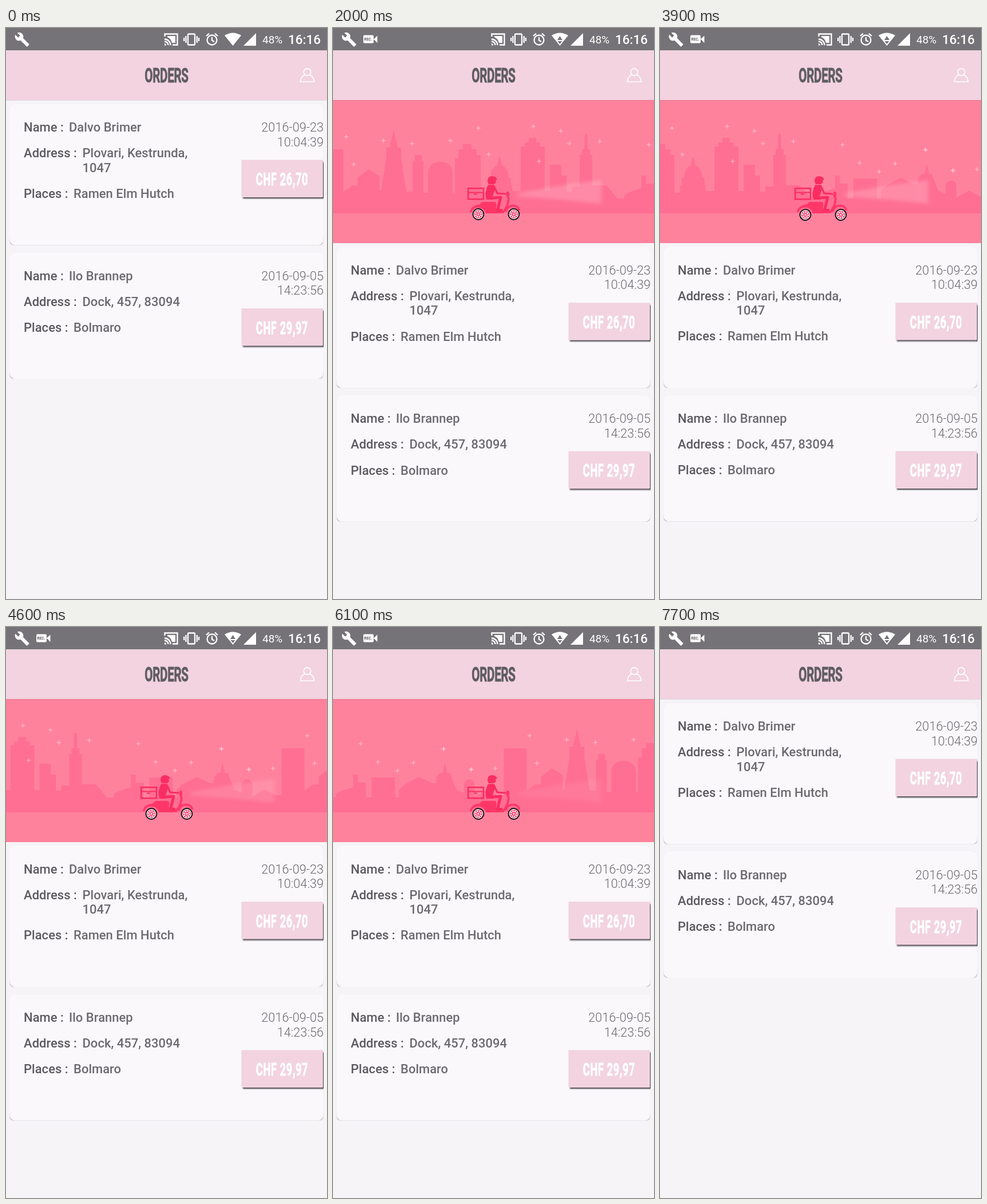
Animation, 561 px wide and 998 px high, one loop 7.8 s. Source, as an HTML page:

```html
<!DOCTYPE html>
<html lang="en">
<head>
<meta charset="utf-8">
<title>Orders</title>
<style>
html, body { margin: 0; width: 100%; height: 100%; overflow: hidden; background: #f6f4f7; }
svg { display: block; width: 100vw; height: 100vh; font-family: Roboto, sans-serif; }
.label { font-size: 22px; font-weight: 500; fill: #5b595e; }
.value { font-size: 22px; font-weight: 500; fill: #6c6a6f; }
.date { font-size: 21.7px; font-weight: 300; fill: #6a686d; text-anchor: end; }
.caps { font-weight: 700; text-anchor: middle; }
.line { fill: none; stroke: #fff; }
.soft { filter: blur(.7px); }
</style>
</head>
<body>
<svg id="stage" viewBox="0 0 561 998"></svg>
<script>
const LOOP = 7800, STEP = 100, TOWN = 824, REST = 249.5;
const SKY = '#ff829d', CITY = '#ff6f93', RED = '#f92d61', BAR = '#757377', PINK = '#f2d3df';

const text = (cls, x, y, str, extra = '') => `<text class="${cls}" x="${x}" y="${y}" ${extra}>${str}</text>`;
// Narrow display face for the title and the prices
const caps = (x, y, size, fill, gap, str) =>
  `<g transform="translate(${x} ${y}) scale(.6 1)">${text('caps', 0, 0, str,
    `font-size="${size}" fill="${fill}" stroke="${fill}" stroke-width=".8" letter-spacing="${gap}"`)}</g>`;
const row = (y, label, x, lines) =>
  text('label', 31, y, label + ' :') + lines.map((s, i) => text('value', x, y + i * 25.5, s)).join('');

function card(y, h, o) {
  const wrap = (o.address.length - 1) * 25.5;
  return `<g transform="translate(0 ${y})">
    <rect x="6.5" y="4" width="548" height="${h - 4}" rx="6" fill="#bfbdc1"/>
    <rect x="6" y="-.5" width="549" height="${h - 6}" rx="9" fill="#f0eef2"/>
    <rect x="6.5" width="548" height="${h}" rx="9" fill="#faf8fb"/>
    ${row(48.5, 'Name', 110, [o.name])}
    ${row(93.5, 'Address', 133.5, o.address)}
    ${row(138.8 + wrap, 'Places', 118, [o.place])}
    ${text('date', 555, 48.5, o.day)}${text('date', 555, 74, o.time)}
    <g clip-path="url(#cardEdge)">
      <rect x="414" y="102" width="143" height="63.5" fill="#3c3a3e" style="filter:blur(1px)"/>
      <rect x="411.5" y="98" width="142.5" height="65.5" rx="1" fill="${PINK}"/>
    </g>
    ${caps(482.5, 142.5, 30.5, '#fff', 1, o.price)}
  </g>`;
}

const stars = [[26,247],[86,190],[99,238],[151,197],[201,202],[268,197],[317,175],[335,221],[413,172],[423,233],
  [461,180],[476,202],[529,198],[615,204],[645,236],[679,251],[707,237],[760,213],[808,249]];
const star = ([x, y]) =>
  `<path d="M${x} ${y - 5}l1.3 3.7 3.7 1.3-3.7 1.3-1.3 3.7-1.3-3.7-3.7-1.3 3.7-1.3z" fill="#fff" opacity="${x > 750 ? .5 : .32}"/>`;

const town = `<g id="town">
  <path class="soft" fill="${CITY}" d="M-14 324V299L12 284 30 294H41V212H81V286L97 275H106V262L125 247 144 259V284H147
    L156 228V209H162L169 178 176 209H182V228L191 286H202V232H206V222H218V232H221V288H229V252Q231 234 250 234
    Q270 234 272 252V288H276V228H282V212H290V203H305V212H314V222H321V288H331V275H334V262H338Q339 244 350 240
    L353 225H355L358 240Q369 244 370 262H374V275H376V285H391V207H398V200H405V192H418V200H425V207H433V285H442
    V239H462V258H471V286H480V277H494V222H498V212H502L503 185H507L508 212H512V222H516V275H540L546 281 560 298H572V292
    L580 287 602 280V258H610V272H624V298H634V263H675V298H682V284L692 275 717 262 740 273H747V262L754 255H758
    L762 237 766 255H771L782 284 795 290V275Q797 267 805 266 813 267 814 275V298H838V324Z"/>
  ${stars.map(star).join('')}</g>`;

const wheel = id => `<g id="${id}"><circle r="9.4" fill="#fff" stroke="#151013" stroke-width="2"/>
  <circle r="6.6" fill="none" stroke="${RED}" stroke-width="1"/>
  <path d="M-6.5 0H6.5M0-6.5V6.5M-4.6-4.6L4.6 4.6M-4.6 4.6L4.6-4.6" stroke="${RED}" stroke-width="1.5"/>
  <circle r="2" fill="#fff" stroke="${RED}"/></g>`;

const bike = `
  <g fill="none" stroke="#ff3768">
    <path d="M284 322H297Q306 312 307 299L304 291" stroke-width="3.6"/>
    <path d="M302 321Q304 310.500 315 310.500 324 311 326 319" stroke-width="3.4"/>
  </g>
  <g fill="#ff3768">
    <path d="M239 322Q241 310 256 308.500L261 304H284L286 309Q283 316 288 320V324H267Q265 314 254 313.500 244 314 242 322Z"/>
    <ellipse cx="305.500" cy="290.500" rx="2.800" ry="4.800"/>
  </g>
  <g fill="none" stroke="${RED}">
    <rect x="236.200" y="280.200" width="26.800" height="19" stroke-width="2.600"/>
    <path d="M236 287.500H263M246 290.500H252" stroke-width="2.200"/>
    <path d="M282 278L287 289 302 290" stroke-width="3.200" stroke-linejoin="round"/>
    <path d="M271 297.500L293 296 287.500 318.500H296" stroke-width="5" stroke-linejoin="round"/>
  </g>
  <g fill="${RED}">
    <path d="M270 268Q270 259 278 259 285 259 287 265L284 266 285 270 281 273H272Z"/>
    <path d="M271 274.500L281 274Q284 276 283 282L279 294 280 300H268Q264 288 271 274.500Z"/>
  </g>
  ${wheel('rear')}${wheel('front')}`;

const statusBar = `<rect width="561" height="39" fill="${BAR}"/>
  <path fill="#fff" transform="translate(14.5 6.5) scale(1.13)" d="M22.7 19l-9.1-9.1c.9-2.3.4-5-1.5-6.9-2-2-5-2.4-7.4-1.3L9 6 6 9 1.6 4.7C.4 7.1.9 10.1 2.9 12.1c1.9 1.9 4.6 2.4 6.9 1.5l9.1 9.1c.4.4 1 .4 1.4 0l2.3-2.3c.5-.4.5-1.1.1-1.4z"/>
  <g class="line" stroke-width="2.3">
    <path d="M277.5 15V10.5H299.5V29.5H291M277 19.5A10.5 10.5 0 0 1 287.5 30M277 23.5A6.5 6.5 0 0 1 283.5 30"/>
    <rect x="318" y="10.5" width="12" height="19" rx="1.5"/>
    <path d="M314.5 14V26M311.2 17V23M333.8 14V26M337 17V23"/>
    <circle cx="360" cy="21" r="8.5"/><path d="M360 16V21.5L364 24M350 14L355 9.7M370 14L365 9.7"/>
  </g>
  <path fill="#fff" d="M277 27A3 3 0 0 1 280 30.5H277ZM282 14H296V26H290Q288 18 282 16Z
    M396.5 31L382 13Q396.5 4 411 13ZM415 31H437V9Z"/>
  ${text('', 448, 27, '48%', 'font-size="19" fill="#fff"')}
  ${text('', 493, 28, '16:16', 'font-size="22.5" font-weight="500" fill="#fff"')}
  <g id="live">
    <rect x="53" y="12.5" width="18" height="14" rx="2" fill="#fff"/><path fill="#fff" d="M71 19.5L77.5 13.5V26Z"/>
    ${text('', 54.5, 22.3, 'REC.', 'font-size="6.5" font-weight="700" fill="#605e62"')}
    <path fill="${BAR}" d="M396.5 14L401 21H392ZM392.5 23H400.5L396.5 28Z"/>
  </g>`;

const header = `<rect y="39" width="561" height="87" fill="${PINK}"/>
  <rect y="126" width="561" height="1" opacity=".1"/>
  ${caps(280.5, 95, 34.5, '#5f5d62', -.6, 'ORDERS')}
  <g class="line" stroke-width="1.7"><circle cx="526.5" cy="77" r="6.2"/>
  <path d="M522 82Q515 85 514.5 94H538.5Q538 85 531 82"/></g>`;

const $ = id => document.getElementById(id);
$('stage').innerHTML = `
  <defs>
    <clipPath id="panelClip"><rect id="panelEdge" y="126" width="561" height="0"/></clipPath>
    <clipPath id="cardEdge"><rect x="400" y="90" width="155" height="90"/></clipPath>
  </defs>
  <rect width="561" height="998" fill="#f6f4f7"/>
  <g clip-path="url(#panelClip)"><g id="scene">
    <rect y="126" width="561" height="250" fill="${SKY}"/>
    <g id="scroll">${town}<use href="#town" x="${TOWN}"/></g>
    <path id="beam" d="M322 289L410 273 469 266V307L410 301 322 294Z" fill="#ffc2d0" style="filter:blur(3px)"/>
    ${bike}
  </g></g>
  <g id="list">
    ${card(132.5, 247, { name: 'Dalvo Brimer', address: ['Plovari, Kestrunda,', '1047'], place: 'Ramen Elm Hutch',
      day: '2016-09-23', time: '10:04:39', price: 'CHF 26,70' })}
    ${card(392, 221, { name: 'Ilo Brannep', address: ['Dock, 457, 83094'], place: 'Bolmaro',
      day: '2016-09-05', time: '14:23:56', price: 'CHF 29,97' })}
  </g>
  ${header}${statusBar}`;

// Piecewise linear value through [time, value] points
function along(points, t) {
  const i = points.findIndex(p => p[0] > t);
  if (i === 0) return points[0][1];
  if (i < 0) return points[points.length - 1][1];
  const [t0, a] = points[i - 1], [t1, b] = points[i];
  return a + (b - a) * (t - t0) / (t1 - t0);
}

const opening = [[1200, 0], [1300, 130], [1400, 276], [1500, 251], [2100, REST]];
const travel = [[1300, -25], [1500, 0], [2700, 151], [3900, 296], [5300, 471], [7000, 674], [7500, 735]];
const beam = [[1500, .4], [2700, .24], [3900, .34], [5300, .1], [7000, .14]];

function pullAt(t) {
  if (t < 7000) return along(opening, t);
  return REST * Math.max(0, 1 - (t - 7000) / 500) ** 3;
}

const move = (id, x, y, turn = 0) => $(id).setAttribute('transform', `translate(${x} ${y}) rotate(${turn})`);

function draw(t) {
  const pull = pullAt(t), road = along(travel, t);
  const height = pull ? Math.min(250, pull + .5) : 0;
  const turn = road / 10 * 180 / Math.PI;
  const axle = 325.5 + along([[2900, 0], [3700, 1]], t);
  move('list', 0, pull);
  $('panelEdge').setAttribute('height', height);
  move('scene', 0, height - 250);
  move('scroll', -((road + TOWN) % TOWN), 0);
  move('rear', 254, axle, turn);
  move('front', 316, axle, turn);
  $('beam').setAttribute('opacity', along(beam, t));
  $('live').setAttribute('opacity', along([[0, 0], [200, 1]], t));
}

const start = performance.now();
function tick() {
  const t = (performance.now() - start) % LOOP;
  draw(t - t % STEP);
  requestAnimationFrame(tick);
}
tick();
</script>
</body>
</html>
```
